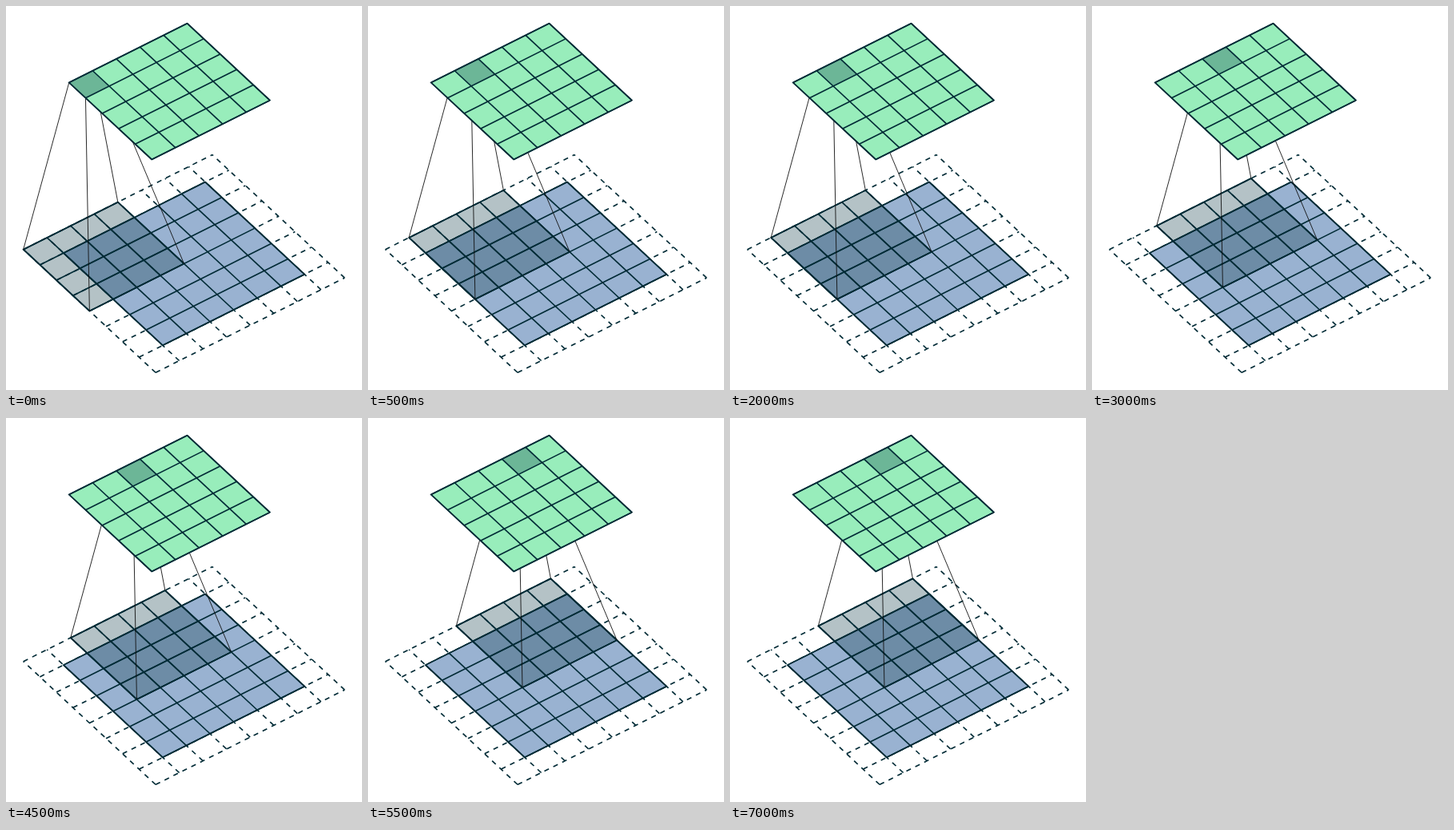
Recreate the animation shown at these times as an HTML page with a canvas. Size 445 by 479 pixels, loop 8000 ms.

```html
<!DOCTYPE html>
<html lang="en">
<head>
<meta charset="utf-8">
<title>Padded convolution</title>
<style>
html, body { margin: 0; height: 100%; overflow: hidden; background: #fff; }
canvas { display: block; }
</style>
</head>
<body>
<canvas id="stage" width="445" height="479"></canvas>
<script>
const ctx = document.getElementById('stage').getContext('2d');

const LOOP = 8000, FIRST = 500, HOLD = 2500;
const INK = '#002b36', SHADE = 'rgba(7,54,66,0.3)';
const BLUE = '#99b2d1', GREEN = '#98edbb';
const THICK = 1.66, THIN = 0.9, DASH = 6.227;

// One cell of the slanted planes: U runs up-right, V runs down-right.
const CELL = 29.53;
const U = [CELL, -CELL / 2], V = [CELL * 0.7, CELL * 0.65];

const plane = (x, y) => (u, v) => [x + u * U[0] + v * V[0], y + u * U[1] + v * V[1]];
const input = plane(21.7, 303.7);
const output = plane(78.8, 95.5);

function line(a, b) {
  ctx.beginPath();
  ctx.moveTo(...a);
  ctx.lineTo(...b);
  ctx.stroke();
}

function square(at, u, v, n) {
  ctx.beginPath();
  ctx.moveTo(...at(u, v));
  ctx.lineTo(...at(u + n, v));
  ctx.lineTo(...at(u + n, v + n));
  ctx.lineTo(...at(u, v + n));
  ctx.closePath();
}

function fillSquare(at, u, v, n, color) {
  square(at, u, v, n);
  ctx.fillStyle = color;
  ctx.fill();
}

function grid(at, u, v, n, dashed) {
  ctx.lineWidth = THICK;
  ctx.setLineDash(dashed ? [DASH, DASH] : []);
  for (let i = 0; i <= n; i++) {
    line(at(u, v + i), at(u + n, v + i));
    line(at(u + i, v + n), at(u + i, v));
  }
  ctx.setLineDash([]);
  if (!dashed) {
    square(at, u, v, n);
    ctx.stroke();
  }
}

function draw(col) {
  ctx.fillStyle = '#fff';
  ctx.fillRect(0, 0, 445, 479);
  ctx.strokeStyle = INK;

  grid(input, 0, 0, 8, true);
  fillSquare(input, 1, 1, 6, BLUE);
  grid(input, 1, 1, 6);
  fillSquare(input, col, 0, 4, SHADE);
  grid(input, col, 0, 4);

  ctx.lineWidth = THIN;
  ctx.strokeStyle = '#111';
  for (const [u, v] of [[0, 0], [1, 0], [0, 1], [1, 1]])
    line(output(col + u, v), input(col + 4 * u, 4 * v));
  ctx.strokeStyle = INK;

  fillSquare(output, 0, 0, 5, GREEN);
  fillSquare(output, col, 0, 1, SHADE);
  grid(output, 0, 0, 5);
}

function tick() {
  const t = performance.now() % LOOP;
  draw(t < FIRST ? 0 : 1 + Math.floor((t - FIRST) / HOLD));
  requestAnimationFrame(tick);
}
tick();
</script>
</body>
</html>
```
